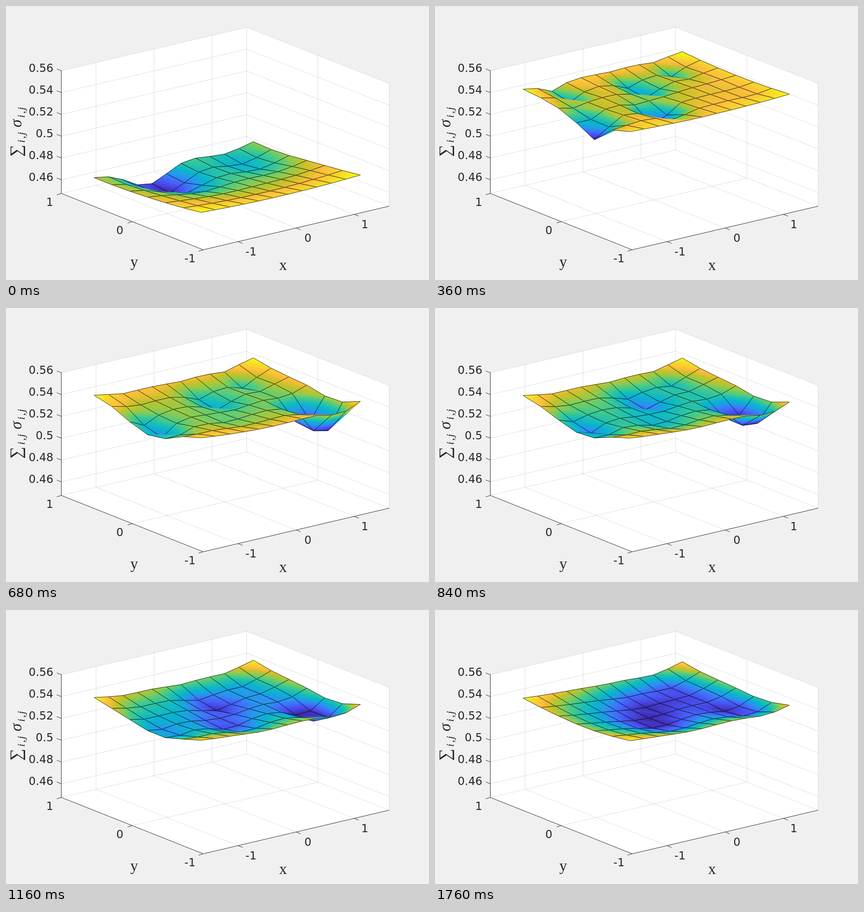
These frames come from a looping animation (929 px wide and 603 px high, 1.84 s). An HTML page with a canvas:

```html
<!DOCTYPE html>
<html lang="en">
<head>
<meta charset="utf-8">
<title>Surface plot</title>
<style>
  html, body { margin: 0; height: 100%; overflow: hidden; background: #f0f0f0; }
  canvas { display: block; }
</style>
</head>
<body>
<canvas id="stage" width="929" height="603"></canvas>
<script>
const ctx = document.getElementById('stage').getContext('2d');
const NX = 11, NY = 6, LOOP = 1840;
const INK = '#262626', GRID = 'rgba(38,38,38,.15)';

const colours = [
  [0, 62, 38, 168], [.12, 71, 75, 232], [.22, 67, 107, 254], [.32, 40, 148, 238],
  [.42, 9, 178, 209], [.5, 25, 190, 183], [.6, 72, 203, 134], [.68, 141, 203, 78],
  [.76, 200, 193, 41], [.84, 254, 190, 60], [.92, 247, 217, 40], [1, 249, 251, 21]
].map(([at, ...rgb]) => [at, `rgb(${rgb})`]);

// Grid places where the surface sinks, each by its own depth in every pose.
const pits = {
  right: [9.6, 1.4], back: [9, 5], middle: [6.1, 4.4], front: [4.3, 1.9],
  edge: [.2, 2.1], side: [.8, 3.4], left: [2, 5.4], valley: [3.7, 5.4]
};

const poses = [
  { at: 0, rim: 8, tilt: 8, sag: 5, bowl: 10, width: 1.3, depth: { back: 18, valley: 45 } },
  { at: 80, rim: 209, sag: 0, bowl: 0, width: .55, depth: { edge: 125 } },
  { at: 240, rim: 194, sag: 0, bowl: 0, width: .55,
    depth: { right: 8, back: 6, front: 50, edge: 42, left: 32 } },
  { at: 520, rim: 194, sag: 12, bowl: 14, width: .7,
    depth: { back: 35, middle: 65, front: 36, edge: 52, side: 38, left: 22 } },
  { at: 680, rim: 185, sag: 12, bowl: 14, width: .75,
    depth: { right: 85, back: 22, middle: 27, front: 5, edge: 20, side: 38, left: 6 } },
  { at: 1000, rim: 185, sag: 12, bowl: 15, width: 1,
    depth: { right: 38, back: 12, middle: 20, front: 16, edge: 17, side: 10, left: 6 } },
  { at: 1440, rim: 186, sag: 12, bowl: 16, width: 1,
    depth: { right: 25, back: 22, middle: 14, front: 10, edge: 3 } },
  { at: 1760, rim: 183, sag: 9, bowl: 18, width: 1.15,
    depth: { right: 20, back: 16, middle: 9, front: 10, edge: 2 } }
];

// The picture holds still between these moments.
const starts = [0, 80, 240, 360, 440, 520, 600, 680, 840, 1000, 1080, 1200, 1280, 1440, 1600, 1760];

// Raised corners, sagging edges, a bowl inside, and Gaussian pits.
function poseHeight({ rim, tilt = 0, sag, bowl, width, depth }, i, j) {
  const u = 2 * i / NX - 1, v = 2 * j / NY - 1;
  let h = rim - tilt * v - sag * (1 - u * u * v * v) - bowl * (1 - u * u) * (1 - v * v);
  for (const name in depth) {
    const [pi, pj] = pits[name];
    h -= depth[name] * Math.exp(-((i - pi) ** 2 + (j - pj) ** 2) / (2 * width * width));
  }
  return h;
}

function heightAt(time, i, j) {
  const n = poses.findLastIndex(pose => pose.at <= time);
  const a = poses[n], b = poses[n + 1], h = poseHeight(a, i, j);
  return b ? h + (poseHeight(b, i, j) - h) * (time - a.at) / (b.at - a.at) : h;
}

// ---- Axes ----

function line(colour, ...points) {
  ctx.strokeStyle = colour;
  ctx.beginPath();
  for (const [x, y] of points) ctx.lineTo(x, y);
  ctx.stroke();
}

function text(str, x, y, font, align = 'center') {
  ctx.font = font;
  ctx.textAlign = align;
  ctx.fillStyle = INK;
  ctx.fillText(str, x, y);
}

function drawAxes() {
  const L = [121.5, 412.5], F = [433, 536.5], R = [841.5, 440.5], B = [528.5, 317];
  const up = ([x, y], d = 271) => [x, y - d];
  const mix = (p, q, t) => [p[0] + (q[0] - p[0]) * t, p[1] + (q[1] - p[1]) * t];
  const tick = ([x, y], dx, dy) => line(INK, [x, y], [x + dx, y + dy]);
  const sans = '24.4px "DejaVu Sans", sans-serif';
  const serif = '"Liberation Serif", serif';

  ctx.fillStyle = '#f0f0f0';
  ctx.fillRect(0, 0, 929, 603);
  ctx.fillStyle = '#fff';
  ctx.beginPath();
  for (const p of [L, F, R, up(R), up(B), up(L)]) ctx.lineTo(...p);
  ctx.fill();

  ctx.lineWidth = 1;
  line(GRID, L, B, R, up(R));
  line(GRID, B, up(B));
  line('rgba(38,38,38,.04)', up(L), up(B), up(R));
  for (let n = 0; n < 3; n++) {
    const label = String(n - 1);
    const xNear = mix(F, R, .1875 + n * .3125), xFar = mix(L, B, .1875 + n * .3125);
    line(GRID, xNear, xFar, up(xFar));
    tick(xNear, 10, 4);
    text(label, 538 + n * 125, 548.5 - n * 30, sans);

    const yNear = mix(F, L, n / 2), yFar = mix(R, B, n / 2);
    if (n === 1) line(GRID, yNear, yFar, up(yFar));
    tick(yNear, -10, 3);
    text(label, 404 - n * 154, 563.5 - n * 62, sans);
  }
  for (let n = 0; n < 6; n++) {
    const d = 30 + n * 48;
    line(GRID, up(L, d), up(B, d), up(R, d));
    tick(up(L, d), -10, -4);
    text(String((46 + 2 * n) / 100), 104, 384.5 - n * 48, sans, 'right');
  }
  line(INK, up(L), L, F, R);

  text('x', 608.5, 581, `34px ${serif}`);
  text('y', 281.5, 574, `34px ${serif}`);
  ctx.save();
  ctx.translate(34, 332);
  ctx.rotate(-Math.PI / 2);
  text('∑', 0, 0, `37px ${serif}`, 'left');
  text('σ', 65, 0, `italic 35px ${serif}`, 'left');
  for (const x of [31, 86]) {
    text('i', x, 7, `italic 24px ${serif}`, 'left');
    text(',', x + 9, 7, `24px ${serif}`, 'left');
    text('j', x + 17, 7, `italic 24px ${serif}`, 'left');
  }
  ctx.restore();
}

// ---- Surface ----

// The value is linear over a triangle, so one linear gradient shades it exactly.
function shade(p, q, r) {
  const ax = q.x - p.x, ay = q.y - p.y, bx = r.x - p.x, by = r.y - p.y;
  const det = ax * by - bx * ay, dq = q.v - p.v, dr = r.v - p.v;
  const gx = (dq * by - dr * ay) / det, gy = (dr * ax - dq * bx) / det;
  const len = gx * gx + gy * gy;
  if (!(len > 1e-8 && len < 1e4)) {
    return colours.reduce((best, c) => Math.abs(c[0] - p.v) < Math.abs(best[0] - p.v) ? c : best)[1];
  }
  const at = v => [p.x + (v - p.v) * gx / len, p.y + (v - p.v) * gy / len];
  const gradient = ctx.createLinearGradient(...at(0), ...at(1));
  for (const [stop, colour] of colours) gradient.addColorStop(stop, colour);
  return gradient;
}

// Fills triangle p-q-r and inks the edges p-q and q-r.
function triangle(p, q, r) {
  ctx.fillStyle = ctx.strokeStyle = shade(p, q, r);
  ctx.beginPath();
  for (const n of [p, q, r]) ctx.lineTo(n.x, n.y);
  ctx.closePath();
  ctx.lineWidth = .8;
  ctx.fill();
  ctx.stroke();
  line('#000', [p.x, p.y], [q.x, q.y], [r.x, r.y]);
}

function drawSurface(time) {
  const heights = Array.from({ length: NX + 1 }, (_, i) =>
    Array.from({ length: NY + 1 }, (_, j) => heightAt(time, i, j)));
  const all = heights.flat(), low = Math.min(...all), high = Math.max(...all);
  const nodes = heights.map((row, i) => row.map((h, j) => ({
    x: 428.3 + 31.82 * i - 39.17 * j,
    y: 470.3 - 7.49 * i - 15.57 * j - h,
    v: (h - low) / (high - low)
  })));
  ctx.lineJoin = 'round';
  for (let i = NX - 1; i >= 0; i--) {
    for (let j = NY - 1; j >= 0; j--) {
      const right = nodes[i + 1][j], left = nodes[i][j + 1];
      triangle(right, nodes[i + 1][j + 1], left);
      triangle(left, nodes[i][j], right);
    }
  }
}

let shown;
function frame() {
  const now = performance.now() % LOOP;
  const start = starts.findLast(t => t <= now);
  if (start !== shown) {
    shown = start;
    drawAxes();
    drawSurface(start);
  }
  requestAnimationFrame(frame);
}
frame();
</script>
</body>
</html>
```
